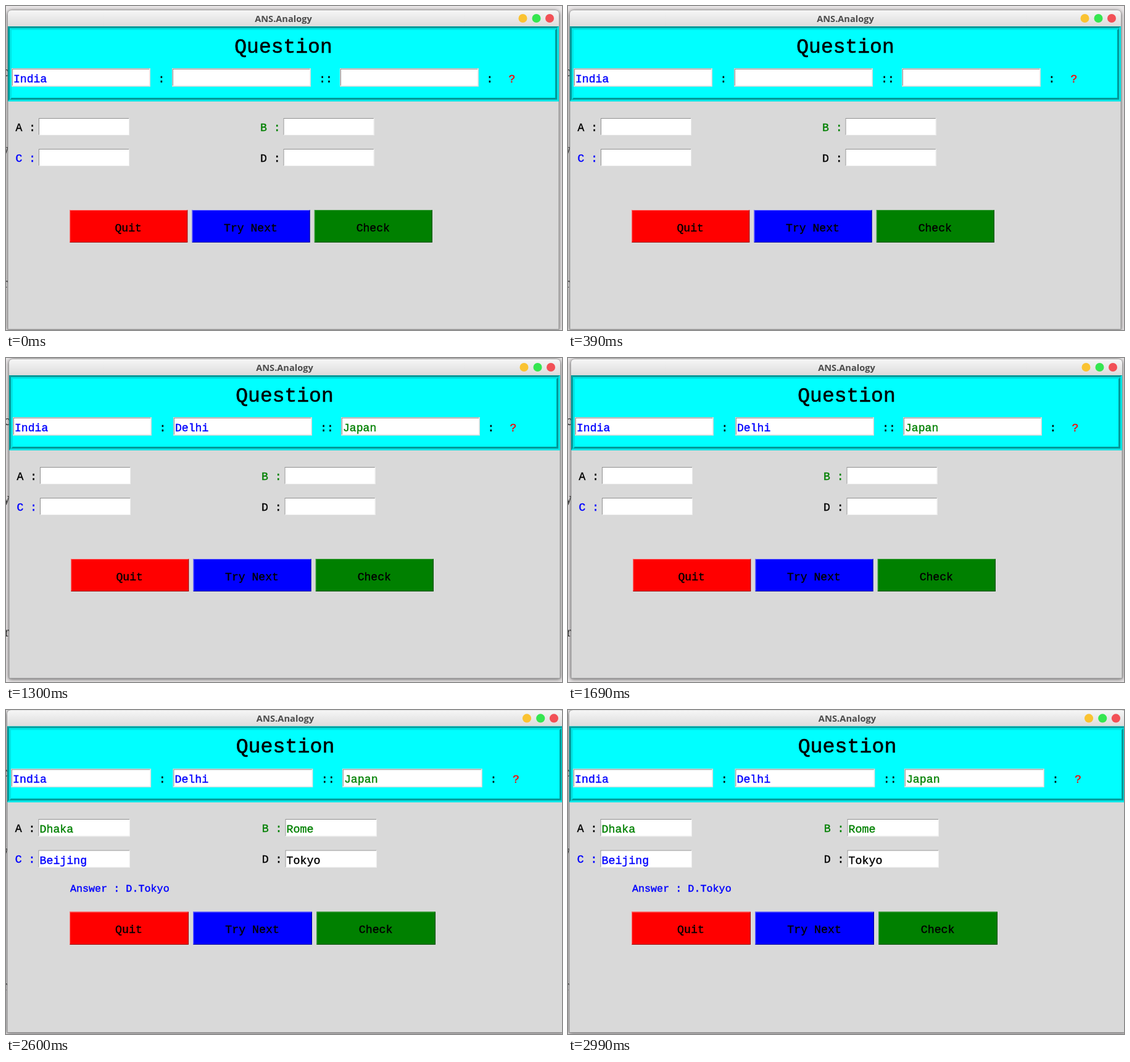
An HTML page for the animation above (3.25 s loop, 901 by 526 pixels).

```html
<!DOCTYPE html>
<html lang="en">
<head>
<meta charset="utf-8">
<title>Analogy quiz</title>
<style>
  html, body { margin: 0; width: 100%; height: 100%; overflow: hidden; background: #eae7e8; }
  svg { display: block; width: 901px; height: 526px; }
  text { font: 18.1px "Liberation Mono", monospace; white-space: pre; stroke-width: 0.4; }
  .window { filter: drop-shadow(0 1px 3px #0009); }
  .behind { font: 20px "Noto Serif", serif; fill: #333; text-anchor: end; }
  .caption { font: bold 14.6px "Open Sans", sans-serif; fill: #4c4c4c; }
  .heading { font-size: 33px; stroke-width: 0.6; }
  .answer { font-size: 16.6px; }
  .mid { text-anchor: middle; }
</style>
</head>
<body>
<svg viewBox="0 0 901 526">
  <defs>
    <linearGradient id="bar" x2="0" y2="1">
      <stop stop-color="#f6f6f6"/><stop offset="1" stop-color="#dcdcdc"/>
    </linearGradient>
  </defs>
  <g id="stage"></g>
</svg>
<script>
const STEP = 650;
const BLUE = '#00f', GREEN = '#008000', RED = '#f00', BLACK = '#000', GRAY = '#d9d9d9';

// The window drifts and resizes a little at each step: [scaleX, scaleY, x, y]
const poses = [
  [1, 1, 0, 0],
  [1.0035, 1.0045, 1, -5.3],
  [1, 1, 2, -5],
  [0.9975, 0.9985, 2, -2.3],
  [1.009, 1.01, -1, -6.8],
];

const rect = (x, y, w, h, fill) =>
  `<rect x="${x}" y="${y}" width="${w}" height="${h}" fill="${fill}"/>`;

const text = (x, y, str, fill = BLACK, cls = '', from = 0) =>
  `<text x="${x}" y="${y}" fill="${fill}" stroke="${fill}" class="${cls}" data-from="${from}">${str}</text>`;

// Two-tone border of thickness b: top and left, then bottom and right
const bevel = (x, y, w, h, b, topLeft, bottomRight) =>
  `<path fill="${topLeft}" d="M${x} ${y}h${w}l${-b} ${b}h${2 * b - w}v${h - 2 * b}l${-b} ${b}z"/>
   <path fill="${bottomRight}" d="M${x + w} ${y + h}h${-w}l${b} ${-b}h${w - 2 * b}v${2 * b - h}l${b} ${-b}z"/>`;

const entry = (x, y, w, str, color, from) =>
  rect(x - 1, y - 1, w + 2, 30, GRAY) + rect(x, y, w, 28, '#fff') +
  bevel(x, y, w, 28, 1, '#909090', '#ececec') +
  text(x + 2, y + 21.8, str, color, '', from);

const option = (x, y, letter, letterColor, str, color) =>
  text(x, y + 20.5, letter + ' :', letterColor) + entry(x + 37.5, y, 147, str, color, 3);

const button = (x, str, fill, light, dark) =>
  rect(x, 331, 191, 53, fill) + bevel(x, 331, 191, 53, 1, light, dark) +
  text(x + 95, 365.5, str, BLACK, 'mid');

const dot = (x, fill) => `<circle cx="${x}" cy="20" r="7" fill="${fill}"/>`;

const stage = document.getElementById('stage');
stage.innerHTML = [
  text(4.5, 114, 'c', '', 'behind'),
  text(4.5, 240, 'y', '', 'behind'),
  text(4.5, 457, 'r', '', 'behind'),

  `<path class="window" fill="${GRAY}" stroke="#909090" d="M3 525V13q0-6 6-6H890q6 0 6 6V525z"/>`,
  '<path fill="url(#bar)" d="M3 33V13q0-6 6-6H890q6 0 6 6V33z"/>',
  text(449.5, 25.5, 'ANS.Analogy', '', 'caption mid'),
  dot(837.5, '#fac332'), dot(859.5, '#35e650'), dot(881, '#f25056'),

  rect(3, 33, 893, 122, '#0ff'),
  bevel(3, 33, 893, 122, 3, '#009999', '#00e5e5'),
  bevel(6, 36, 887, 116, 3, '#00e5e5', '#009999'),
  text(449.5, 75.5, 'Question', BLACK, 'heading mid'),
  entry(10, 102, 223, 'India', BLUE, 0),
  text(252, 124, ':', BLACK, 'mid'),
  entry(270, 102, 223, 'Delhi', BLUE, 1),
  text(518, 124, '::', BLACK, 'mid'),
  entry(542, 102, 223, 'Japan', GREEN, 2),
  text(784, 124, ':', BLACK, 'mid'),
  text(820, 124, '?', RED, 'mid'),

  option(15.5, 182, 'A', BLACK, 'Dhaka', GREEN),
  option(412, 182, 'B', GREEN, 'Rome', GREEN),
  option(15.5, 232, 'C', BLUE, 'Beijing', BLUE),
  option(412, 232, 'D', BLACK, 'Tokyo', BLACK),
  text(104, 299, 'Answer : D.Tokyo', BLUE, 'answer', 4),

  button(103.2, 'Quit', RED, '#ff7f7f', '#990000'),
  button(301.5, 'Try Next', BLUE, '#7f7fff', '#000099'),
  button(499.8, 'Check', GREEN, '#40a040', '#004c00'),
].join('');

const labels = [...stage.querySelectorAll('text')];

function draw() {
  const step = Math.floor(performance.now() / STEP) % poses.length;
  const [sx, sy, x, y] = poses[step];
  stage.setAttribute('transform', `matrix(${sx} 0 0 ${sy} ${x} ${y})`);
  for (const label of labels) {
    label.setAttribute('visibility', label.dataset.from <= step ? 'visible' : 'hidden');
  }
  requestAnimationFrame(draw);
}
draw();
</script>
</body>
</html>
```
